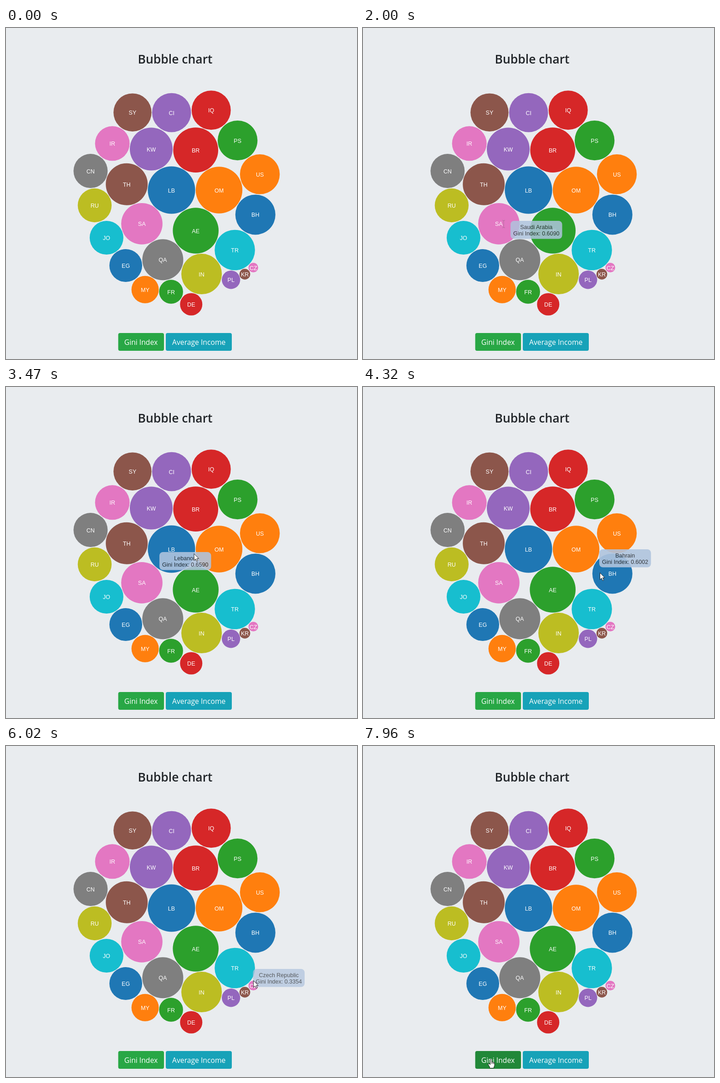
Recreate the animation shown at these times as an HTML page. Size 771 px wide and 726 px high, loop 8 s.

```html
<!DOCTYPE html>
<html lang="en">
<head>
<meta charset="utf-8">
<title>Bubble chart</title>
<style>
  html, body { margin: 0; width: 100%; height: 100%; overflow: hidden; background: #e9ecef; }
  svg { display: block; width: 771px; height: 726px; }
  text { text-anchor: middle; }
  .title { font: 600 26.5px "Open Sans", sans-serif; fill: #212529; }
  .button { font: 15.7px "Open Sans", sans-serif; fill: #fff; }
  .label, #tip { font: 12.5px "Liberation Sans", Arial, sans-serif; }
  .label { fill: #fff; }
</style>
</head>
<body>
<svg viewBox="0 0 771 726">
  <rect width="771" height="726" fill="#e9ecef"/>
  <text class="title" x="371.5" y="78">Bubble chart</text>
  <g id="bubbles"></g>
  <rect id="gini" x="246.5" y="669" width="100.5" height="39" rx="4"/>
  <rect x="351" y="669" width="145" height="39" rx="4" fill="#17a2b8"/>
  <text class="button" x="296.5" y="695">Gini Index</text>
  <text class="button" x="423.7" y="695">Average Income</text>
  <g id="tip">
    <rect width="113.5" height="39.5" rx="8" fill="#b0c4de"/>
    <text id="country" x="56.7" y="17.5" fill="#212529"></text>
    <text id="value" x="56.7" y="31.5" fill="#212529"></text>
  </g>
  <g id="cursor">
    <path id="arrow" d="M.5 .5V15.5L4 12.2L6.4 17.6L8.8 16.5L6.5 11.3H11Z" fill="#fff" stroke="#111" stroke-width=".9"/>
    <path id="beam" d="M-3 -8H-1L0 -7L1 -8H3M0 -7V7M-3 8H-1L0 7L1 8H3" fill="none" stroke="#555" stroke-width=".8" opacity=".45"/>
    <path id="hand" d="M-1.6 1.2Q0 -1.4 1.5 1.2V6.2Q3 5 4 6.6Q5.6 5.8 6.3 7.4Q8 7 8 9V13Q8 15.5 6.4 17V19.5H-2.6V17.2L-5.6 12.2Q-6.6 10 -4.8 9.6Q-3.4 9.4 -1.6 12ZM1.5 6.2V10M4 6.6V10.2M6.3 7.4V10.5" fill="#fff" stroke="#111" stroke-width=".9" stroke-linejoin="round"/>
  </g>
</svg>
<script>
const LOOP = 8000;
const COLORS = ['#1f77b4', '#ff7f0e', '#2ca02c', '#d62728', '#9467bd',
                '#8c564b', '#e377c2', '#7f7f7f', '#bcbd22', '#17becf'];

// code, centre x, centre y, radius; colours cycle in this order
const BUBBLES = [
  ['LB', 363.5, 355.5, 52], ['OM', 468, 355.5, 51.2], ['AE', 416.7, 444.5, 50.3],
  ['BR', 416.7, 267.7, 49.4], ['KW', 319, 265.5, 47], ['TH', 265.2, 342.7, 46],
  ['SA', 298.4, 429.3, 45.4], ['QA', 344.4, 508.2, 45], ['IN', 429.6, 539.6, 44.5],
  ['TR', 502.6, 487, 44.3], ['BH', 547.8, 409.4, 44], ['US', 557.6, 320.8, 43.7],
  ['PS', 508.7, 246.6, 43.7], ['IQ', 450.7, 180.2, 43], ['CI', 363.7, 185.6, 42.8],
  ['SY', 277.9, 185.2, 41.8], ['IR', 233.6, 253.3, 38], ['CN', 185.8, 313.6, 37.5],
  ['RU', 194.8, 389, 37.2], ['JO', 220.8, 460, 37], ['EG', 263.1, 521, 36],
  ['MY', 305.6, 573.8, 30], ['FR', 362.6, 578.5, 26.3], ['DE', 406.8, 606, 24.5],
  ['PL', 494.2, 552.2, 20.2], ['KR', 524.6, 540, 11.8], ['CZ', 543.3, 525.5, 10.6]
];

// time, x, y, pointer shape from that time on
const POINTER = [
  [610, 540, 695, 'arrow'], [850, 430, 555, 'arrow'], [1070, 378, 502, 'arrow'],
  [1440, 378, 502, 'arrow'], [1620, 324, 451, 'arrow'], [1920, 309, 430, 'beam'],
  [2500, 309, 430, 'arrow'], [2620, 330, 406, 'arrow'], [2820, 350, 380, 'arrow'],
  [3370, 350, 380, 'arrow'], [3580, 480, 349, 'arrow'], [3780, 485, 345, 'arrow'],
  [4140, 485, 345, 'arrow'], [4230, 519, 388, 'arrow'], [4320, 520, 407, 'arrow'],
  [4480, 521, 415, 'arrow'], [4700, 528, 454, 'arrow'], [4930, 531, 500, 'arrow'],
  [5010, 532, 506, 'arrow'], [5300, 543, 514, 'arrow'], [6950, 547, 523, 'beam'],
  [7255, 547, 523, 'beam'], [7260, 493, 546, 'beam'], [7330, 450, 572, 'arrow'],
  [7560, 297, 680, 'hand'], [7790, 279, 688, 'hand'], [7955, 279, 688, 'hand'],
  [7960, 281, 687, 'hand']
];

// time, then country, Gini index and place; a bare time starts a fade-out
const HOVERS = [
  [840, 'Qatar', '0.6063', 388, 488], [1480],
  [1600, 'Saudi Arabia', '0.6090', 324, 423], [1880],
  [2520, 'Saudi Arabia', '0.6090', 309.5, 400],
  [2680, 'Lebanon', '0.6590', 337, 362], [3390],
  [3550, 'Oman', '0.6502', 480, 321], [4140],
  [4200, 'Bahrain', '0.6002', 519, 356], [4480],
  [4680, 'Turkey', '0.6013', 528, 426], [5010],
  [5300, 'Czech Republic', '0.3354', 542.5, 489], [5840],
  [6360, 'Czech Republic', '0.3354', 542.5, 489],
  [7255, 'Korea', '0.3444', 523.5, 499.5], [7270]
];

const $ = id => document.getElementById(id);
const ease = p => p < .5 ? 4 * p ** 3 : 1 - 4 * (1 - p) ** 3;
const mix = (a, b, p) => a + (b - a) * p;

$('bubbles').innerHTML = BUBBLES.map(([code, x, y, r], i) =>
  `<circle cx="${x}" cy="${y}" r="${r}" fill="${COLORS[i % 10]}"/>` +
  `<text class="label" x="${x}" y="${y + 5}">${code}</text>`).join('');

function tipAt(t) {
  let alpha = 0, shown = null;
  for (let i = 0; i < HOVERS.length && HOVERS[i][0] <= t; i++) {
    const h = HOVERS[i], enter = h.length > 1;
    const end = i + 1 < HOVERS.length ? Math.min(t, HOVERS[i + 1][0]) : t;
    const p = Math.min(1, (end - h[0]) / (enter ? 200 : 500));
    alpha = mix(alpha, enter ? .9 : 0, ease(p));
    if (enter) shown = h;
  }
  return { alpha, shown };
}

function pointerAt(t) {
  const i = POINTER.findLastIndex(k => k[0] <= t);
  if (i < 0) return null;
  const a = POINTER[i], b = POINTER[i + 1] || a;
  const p = b === a ? 0 : (t - a[0]) / (b[0] - a[0]);
  // text and rest poses hold still until the next move
  const hold = a[3] === 'beam' || a[0] === 5300;
  return { x: mix(a[1], b[1], hold ? 0 : p), y: mix(a[2], b[2], hold ? 0 : p), shape: a[3] };
}

function draw(t) {
  const { alpha, shown } = tipAt(t);
  $('tip').setAttribute('opacity', alpha);
  if (shown) {
    $('tip').setAttribute('transform', `translate(${shown[3]} ${shown[4]})`);
    $('country').textContent = shown[1];
    $('value').textContent = 'Gini Index: ' + shown[2];
  }
  const c = pointerAt(t);
  $('cursor').style.display = c ? '' : 'none';
  if (c) {
    $('cursor').setAttribute('transform', `translate(${c.x} ${c.y})`);
    for (const s of ['arrow', 'beam', 'hand']) $(s).style.display = s === c.shape ? '' : 'none';
  }
  const hover = Math.min(1, Math.max(0, (t - 7560) / 150));
  $('gini').setAttribute('fill',
    `rgb(${mix(40, 33, hover)},${mix(167, 136, hover)},${mix(69, 56, hover)})`);
}

const start = performance.now();
function tick() {
  draw((performance.now() - start) % LOOP);
  requestAnimationFrame(tick);
}
draw(0);
requestAnimationFrame(tick);
</script>
</body>
</html>
```
